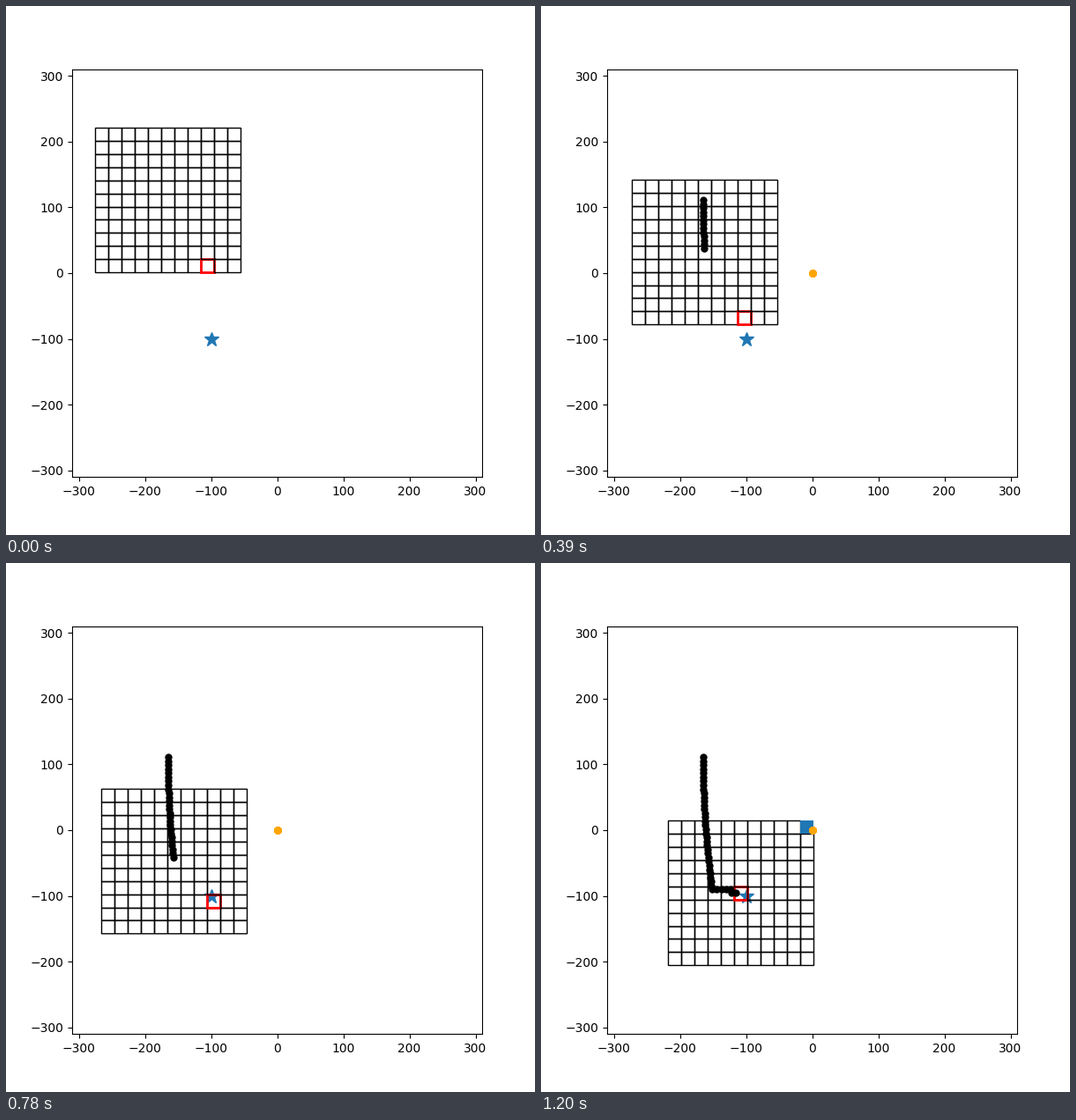
Animation, 600 px wide and 600 px high, one loop 1.23 s. Source, as a matplotlib script:

```python
import numpy as np
import matplotlib.pyplot as plt
from matplotlib.animation import FuncAnimation
from matplotlib.patches import Rectangle

FRAMES, INTERVAL = 41, 30
CELLS, SIZE = 11, 20
HALF = CELLS * SIZE / 2
STAR, GOAL = (-100, -100), (0, 0)
LANDING, DIP = 33, 38   # steps at which the descent ends and the last drop comes

fig, ax = plt.subplots(figsize=(6, 6), dpi=100)
ax.set_xlim(-310, 310)
ax.set_ylim(-310, 310)

cells = {}
for col in range(CELLS):
    for row in range(CELLS):
        cells[col, row] = ax.add_patch(Rectangle((0, 0), SIZE, SIZE))

ax.plot(*STAR, "*", color="C0", markersize=12, zorder=0.5)
goal_dots, = ax.plot([], [], "o", color="orange", markersize=5)
trail, = ax.plot([], [], "o", color="black", markersize=5)


def centre(n):
    """Steady descent with growing sideways drift, then a slide with one drop."""
    fall = np.minimum(n, LANDING)
    dip = np.where(n >= DIP, 1, 0)
    slide = np.maximum(n - LANDING, 0) - dip
    x = -165 + 0.01267 * fall ** 2 + 7 * slide + dip
    y = 111.2 - 6.105 * fall - 5.4 * dip
    return x, y


def cell_index(point, corner):
    return tuple(int((p - c) // SIZE) for p, c in zip(point, corner))


def style(cell, face, edge, width):
    cell.set_facecolor(face)
    cell.set_edgecolor(edge)
    cell.set_linewidth(width)


def update(n):
    x, y = centre(n)
    corner = x - HALF, y - HALF
    # The marked cell is the one nearest to the star.
    marked = tuple(min(max(i, 0), CELLS - 1)
                   for i in cell_index(STAR, corner))
    reached = cell_index(GOAL, corner)

    for (col, row), cell in cells.items():
        cell.set_xy((corner[0] + col * SIZE, corner[1] + row * SIZE))
        if (col, row) == marked:
            style(cell, "none", "red", 2)
        elif (col, row) == reached:
            style(cell, "C0", "none", 0)
        else:
            style(cell, "none", "black", 1)

    # One more goal dot is stacked at every step.
    goal_dots.set_data([GOAL[0]] * n, [GOAL[1]] * n)
    trail.set_data(*centre(np.arange(n)))
    return [*cells.values(), goal_dots, trail]


anim = FuncAnimation(fig, update, frames=FRAMES, interval=INTERVAL,
                     repeat=True, repeat_delay=0)
plt.show()
```
